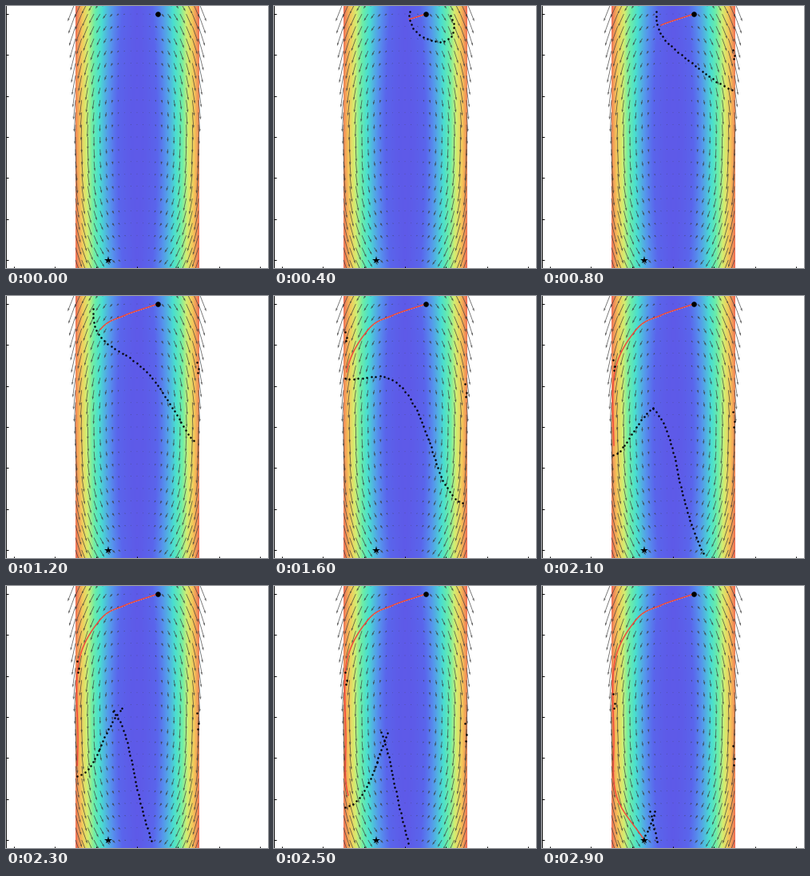
These frames come from a looping animation (328x328 px, 3 s). A matplotlib script:

```python
import numpy as np
import matplotlib.pyplot as plt
from matplotlib.animation import FuncAnimation
from matplotlib.colors import LinearSegmentedColormap

SIZE, DPI, FRAMES = 328, 80, 30
PT = 72 / DPI
MID, HALF = 164, 77.5            # channel centre and half width
WALL = 75                        # how far from the centre the front can go
TOP, FLOOR = 7, 322
CELL = 51.3                      # one axis unit in pixels
START, GOAL = (190, 10), (128, 318)

# Pixels per frame
DOWN, SPREAD, SPEED = 14.0, 0.065, 6.2
WALL_FLOW = DOWN * (WALL / HALF) ** 2
TAIL = 16                        # length kept where the front crosses itself
STEPS = 10                       # substeps per frame


def flow(z, y):
    """Current at distance z from the centre line: fast walls, spread then squeeze."""
    return SPREAD * z * (MID - y) / 154, DOWN * (z / HALF) ** 2


def arc(curve):
    return np.r_[0, np.cumsum(np.hypot(*np.diff(curve, axis=0).T))]


def at(curve, dist):
    s = arc(curve)
    return np.column_stack([np.interp(dist, s, curve[:, i]) for i in (0, 1)])


def cross(a, b):
    return a[..., 0] * b[..., 1] - a[..., 1] * b[..., 0]


def self_crossing(curve):
    """Widest pair of segments that cross, or None."""
    a, d = curve[:-1], np.diff(curve, axis=0)
    gap = a[None] - a[:, None]
    with np.errstate(divide="ignore", invalid="ignore"):
        den = cross(d[:, None], d[None])
        t = cross(gap, d[None]) / den
        u = cross(gap, d[:, None]) / den
    hits = np.argwhere(np.triu((t > 0) & (t < 1) & (u > 0) & (u < 1), 2))
    return hits[np.argmax(hits[:, 1] - hits[:, 0])] if len(hits) else None


def advance(rays, dt):
    """Move rays (z, y, px, py) with the current and turn their headings."""
    z, y, px, py = rays.T
    u, v = flow(z, y)
    ux, uy = SPREAD * (MID - y) / 154, -SPREAD * z / 154
    vx = 2 * DOWN * z / HALF ** 2
    rate = np.column_stack([u + SPEED * px, v + SPEED * py,
                            -(ux * px + vx * py), -uy * px])
    rays = rays + dt * rate
    rays[:, 0] = np.clip(rays[:, 0], -WALL, WALL)
    rays[:, 2:] /= np.hypot(rays[:, 2], rays[:, 3])[:, None]
    return rays[rays[:, 1] > TOP]


def follow_wall(rays, side, lead, dt):
    """The fastest point on a wall runs down it and sheds new rays."""
    if lead is not None:
        lead += (WALL_FLOW + SPEED) * dt
    hits = np.flatnonzero(rays[:, 0] * side >= WALL)
    if len(hits):
        i = hits[np.argmax(rays[hits, 1])]
        lead = rays[i, 1] if lead is None else max(lead, rays[i, 1])
        rays = rays[i:] if side < 0 else rays[:i + 1]
    if lead is not None:
        new = [[side * WALL, lead, 0, 1]]
        rays = np.vstack([new, rays] if side < 0 else [rays, new])
    return rays, lead


def trim(rays):
    """Cut away the part of the front that others have overtaken."""
    idx = np.arange(0, len(rays), 4)
    pair = self_crossing(rays[idx, :2])
    if pair is None:
        return rays
    s = arc(rays[:, :2])
    lo, hi = s[idx[pair[0]]] + TAIL, s[idx[pair[1] + 1]] - TAIL
    return rays[(s <= lo) | (s >= hi)]


def front_dots(rays, gap=5.5):
    curve = rays[:, :2] + [MID, 0]
    s = arc(curve)
    d = np.arange(0, s[-1], gap)
    seg = np.clip(np.searchsorted(s, d, side="right") - 1, 0, len(s) - 2)
    return at(curve, d)[np.diff(s)[seg] < 6]


def wall_trail(side, age):
    """Three dots swept slowly down a wall, drifting apart."""
    y = 8 + (WALL_FLOW - SPEED) * age + (7 + 0.6 * age) * np.array([0, 0.65, 1])
    return np.column_stack([MID + side * WALL + np.array([0, 1.5, 1]), y])


def simulate():
    phi = np.linspace(-np.pi, np.pi, 900)
    rays = np.column_stack([np.full(900, START[0] - MID), np.full(900, START[1]),
                            np.sin(phi), np.cos(phi)]).astype(float)
    lead = {-1: None, 1: None}
    born = {-1: 10.6, 1: 1.2}    # when each trail enters at the top
    frames = [np.empty((0, 2))]
    for k in range(1, FRAMES):
        for _ in range(STEPS):
            rays = advance(rays, 1 / STEPS)
            for side in lead:
                rays, lead[side] = follow_wall(rays, side, lead[side], 1 / STEPS)
        rays = trim(rays)
        parts = [front_dots(rays)]
        parts += [wall_trail(s, k - born[s]) for s in lead if lead[s] is not None]
        pts = np.vstack(parts)
        frames.append(pts[pts[:, 1] < FLOOR])
    return frames


def spline(points, steps=20):
    """Catmull-Rom curve through the points."""
    p = np.asarray(points, float)
    p = np.vstack([2 * p[0] - p[1], p, 2 * p[-1] - p[-2]])
    t = np.linspace(0, 1, steps, endpoint=False)[:, None]
    parts = []
    for a, b, c, d in zip(p, p[1:], p[2:], p[3:]):
        parts.append(b + 0.5 * t * (c - a + t * (2 * a - 5 * b + 4 * c - d
                                                 + t * (3 * (b - c) + d - a))))
    return np.vstack(parts + [p[-2:-1]])


fig = plt.figure(figsize=(SIZE / DPI, SIZE / DPI), dpi=DPI, facecolor="white")
ax = fig.add_axes([0, 0, 1, 1])
ax.set(xlim=(0, SIZE), ylim=(SIZE, 0))
ticks = MID + CELL * np.arange(-3, 4)
ax.set_xticks(ticks)
ax.set_yticks(ticks)
ax.tick_params(direction="in", length=2.5 * PT, width=PT,
               labelbottom=False, labelleft=False)
ax.spines["top"].set_visible(False)

# Flow speed as colour
stops = [(0, 94, 90, 232), (0.1, 90, 102, 236), (0.2, 86, 148, 237),
         (0.36, 74, 222, 208), (0.5, 108, 238, 168), (0.65, 212, 237, 112),
         (0.8, 244, 200, 90), (1, 238, 108, 86)]
cmap = LinearSegmentedColormap.from_list(
    "speed", [(s, (r / 255, g / 255, b / 255)) for s, r, g, b in stops])
gz, gy = np.meshgrid(np.linspace(-HALF, HALF, 156), np.linspace(0, SIZE, 165))
ax.imshow(np.hypot(*flow(gz, gy)), cmap=cmap, vmin=0, aspect="auto",
          extent=(MID - HALF, MID + HALF, SIZE, 0), interpolation="bilinear")

# Flow arrows
qz, qy = np.meshgrid(7.7 * np.arange(-10, 11), MID + 15.4 * np.arange(-11, 11))
ax.quiver(qz + MID, qy, *flow(qz, qy), angles="xy", scale_units="xy", scale=0.56,
          units="dots", width=0.8, color="#3c3c3c", alpha=0.8, zorder=2)

# Best route: frame, x, y
keys = np.array([(0, *START), (8, 149, 24), (12, 118, 42), (16, 91, 95),
                 (21, 90, 187), (25, 93, 262), (29, *GOAL)])
route = spline(keys[:, 1:])
marks = arc(route)[::20]

line, = ax.plot([], [], color="#ee4a3c", lw=1.5 * PT, zorder=3)
beads, = ax.plot([], [], "o", color="#e08a78", ms=1.1 * PT, mew=0, zorder=4)
dots, = ax.plot([], [], "o", color="black", ms=2.5 * PT, mew=0, zorder=5)
ax.plot(*START, "o", color="black", ms=6.6 * PT, mew=0, zorder=6)
ax.plot(*GOAL, "*", color="black", ms=9.5 * PT, mew=0, zorder=6)

fronts = simulate()


def draw(k):
    reach = np.interp(k, keys[:, 0], marks)
    line.set_data(*at(route, np.linspace(0, reach, 200)).T)
    beads.set_data(*at(route, np.arange(0, min(reach, marks[2]), 3.2)).T)
    dots.set_data(*fronts[k].T)
    return line, beads, dots


anim = FuncAnimation(fig, draw, frames=FRAMES, interval=100, repeat=True,
                     repeat_delay=0, blit=False)
plt.show()
```
